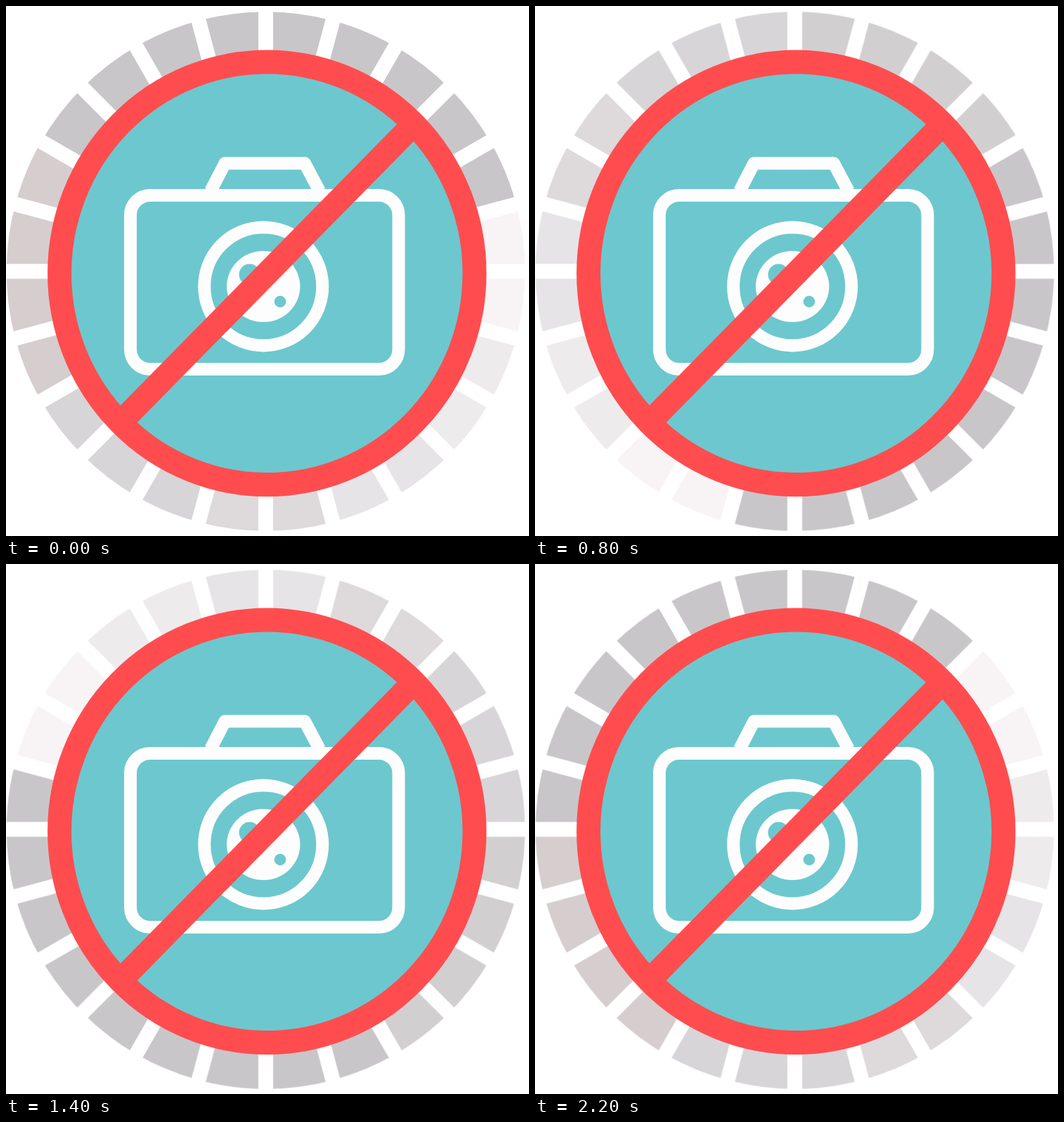
Animation, 744 px wide and 753 px high, one loop 2300 ms. Source, as an HTML page:

```html
<!DOCTYPE html>
<html lang="en">
<head>
<meta charset="utf-8">
<title>No photos</title>
<style>
  html, body { margin: 0; width: 100%; height: 100%; overflow: hidden; background: #fff; }
  svg { display: block; width: 100%; height: 100%; }

  #ring {
    transform-origin: 369.5px 377px;
    animation: spin 2300ms steps(23, end) infinite;
  }
  .tail { fill: #d6cdcf; animation: tint 2300ms step-end infinite; }

  @keyframes spin { to { transform: rotate(345deg); } }
  @keyframes tint {
    0%, 65.21% { fill: #d6cdcf; }
    13.04% { fill: #d2cfd1; }
  }

  .red { fill: none; stroke: #ff4d4f; stroke-width: 34; }
  .camera { fill: none; stroke: #fdfdfd; stroke-width: 18; stroke-linejoin: round; }
  .teal { fill: #6cc8ce; }
</style>
</head>
<body>
<svg viewBox="0 0 744 753">
  <g id="ring"></g>

  <ellipse class="teal" cx="371.3" cy="379.8" rx="290" ry="295"/>

  <g class="camera">
    <path d="M291 263 L311.5 223.5 H425 L446 263"/>
    <rect x="177" y="269" width="381.5" height="247" rx="28"/>
    <circle cx="366.2" cy="398.4" r="84"/>
  </g>
  <ellipse cx="366.2" cy="398.5" rx="52.2" ry="50.5" fill="#fdfdfd"/>
  <circle class="teal" cx="346.5" cy="381.5" r="15"/>
  <circle class="teal" cx="390" cy="420" r="8.3"/>

  <g class="red">
    <path d="M580 168 L163 591.5"/>
    <ellipse cx="371.3" cy="379.8" rx="295.2" ry="300.3"/>
  </g>
</svg>
<script>
  const ring = document.getElementById('ring');
  const cx = 369.5, cy = 377, radius = 368.8, count = 24, step = 360 / count;

  // Shades ahead of the darkest tile, as [colour, number of tiles]
  const shades = [
    ['#c9c6c9', 1], ['#f8f3f5', 2], ['#eeebed', 2], ['#e6e4e6', 2],
    ['#ded9db', 2], ['#d7d5d8', 3], ['tail', 4], ['#c9c6c9', 8]
  ].flatMap(([shade, n]) => Array(n).fill(shade));

  const point = deg => {
    const a = deg * Math.PI / 180;
    return `${cx + radius * Math.cos(a)} ${cy + radius * Math.sin(a)}`;
  };

  function addPath(d, attrs) {
    const path = document.createElementNS('http://www.w3.org/2000/svg', 'path');
    path.setAttribute('d', d);
    for (const name in attrs) path.setAttribute(name, attrs[name]);
    ring.append(path);
  }

  shades.forEach((shade, i) => {
    const from = (i - 2) * step;
    const d = `M${cx} ${cy} L${point(from)} A${radius} ${radius} 0 0 1 ${point(from + step)} Z`;
    addPath(d, shade === 'tail' ? { class: 'tail' } : { fill: shade });
  });

  // White spokes cut parallel-sided gaps between the tiles
  for (let deg = 0; deg < 180; deg += step) {
    addPath(`M${point(deg)} L${point(deg + 180)}`, {
      stroke: '#fff', 'stroke-width': 21, 'stroke-linecap': 'square'
    });
  }
</script>
</body>
</html>
```
